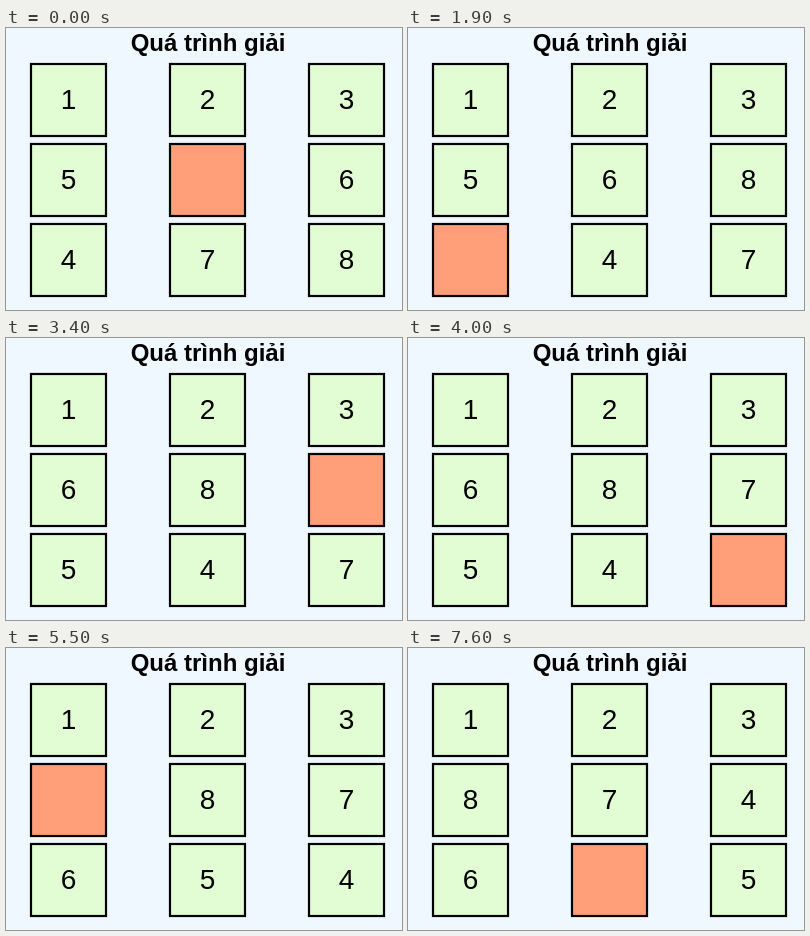
Write an HTML page that moves like this. It is 396 px wide and 282 px high and loops after 8 s.

```html
<!DOCTYPE html>
<html lang="vi">
<head>
<meta charset="utf-8">
<title>Quá trình giải</title>
<style>
  html, body { margin: 0; width: 100%; height: 100%; overflow: hidden; background: #eff7ff; }
  svg { display: block; width: 396px; height: 282px; }
  text { font-family: "Liberation Sans", Arial, sans-serif; text-anchor: middle; fill: #000; }
  .title { font-size: 24px; font-weight: bold; }
  .digit { font-size: 28px; }
  rect { fill: #e2fdd3; stroke: #000; stroke-width: 2.2px; }
  rect.blank { fill: #ff9f7a; }
</style>
</head>
<body>
<svg viewBox="0 0 396 282">
  <text class="title" x="202" y="23">Quá trình giải</text>
</svg>
<script>
const LOOP = 8000;
const START = [1, 2, 3, 5, 0, 6, 4, 7, 8];
// The gap keeps circling through the lower six cells.
const CIRCUIT = [4, 5, 8, 7, 6, 3];
const MOVE_TIMES = [400, 900, 1400, 1900, 2400, 2900, 3400, 4000,
                    4500, 5000, 5500, 6000, 6500, 7100, 7600];

const svg = document.querySelector("svg");

function add(name, attributes) {
  const node = document.createElementNS("http://www.w3.org/2000/svg", name);
  for (const key in attributes) node.setAttribute(key, attributes[key]);
  return svg.appendChild(node);
}

const cells = START.map((_, i) => {
  const x = 25 + 139 * (i % 3);
  const y = 36 + 80 * Math.floor(i / 3);
  return {
    box: add("rect", { x, y, width: 75, height: 72 }),
    label: add("text", { class: "digit", x: x + 37.5, y: y + 45 })
  };
});

function boardAfter(moves) {
  const board = [...START];
  for (let i = 0; i < moves; i++) {
    const from = CIRCUIT[i % CIRCUIT.length];
    const to = CIRCUIT[(i + 1) % CIRCUIT.length];
    [board[from], board[to]] = [board[to], board[from]];
  }
  return board;
}

let shownMoves = -1;

function render(now) {
  const time = now % LOOP;
  const moves = MOVE_TIMES.filter(t => t <= time).length;
  if (moves !== shownMoves) {
    shownMoves = moves;
    boardAfter(moves).forEach((value, i) => {
      cells[i].box.classList.toggle("blank", value === 0);
      cells[i].label.textContent = value || "";
    });
  }
}

const startTime = performance.now();
function tick() {
  render(performance.now() - startTime);
  requestAnimationFrame(tick);
}
tick();
</script>
</body>
</html>
```
